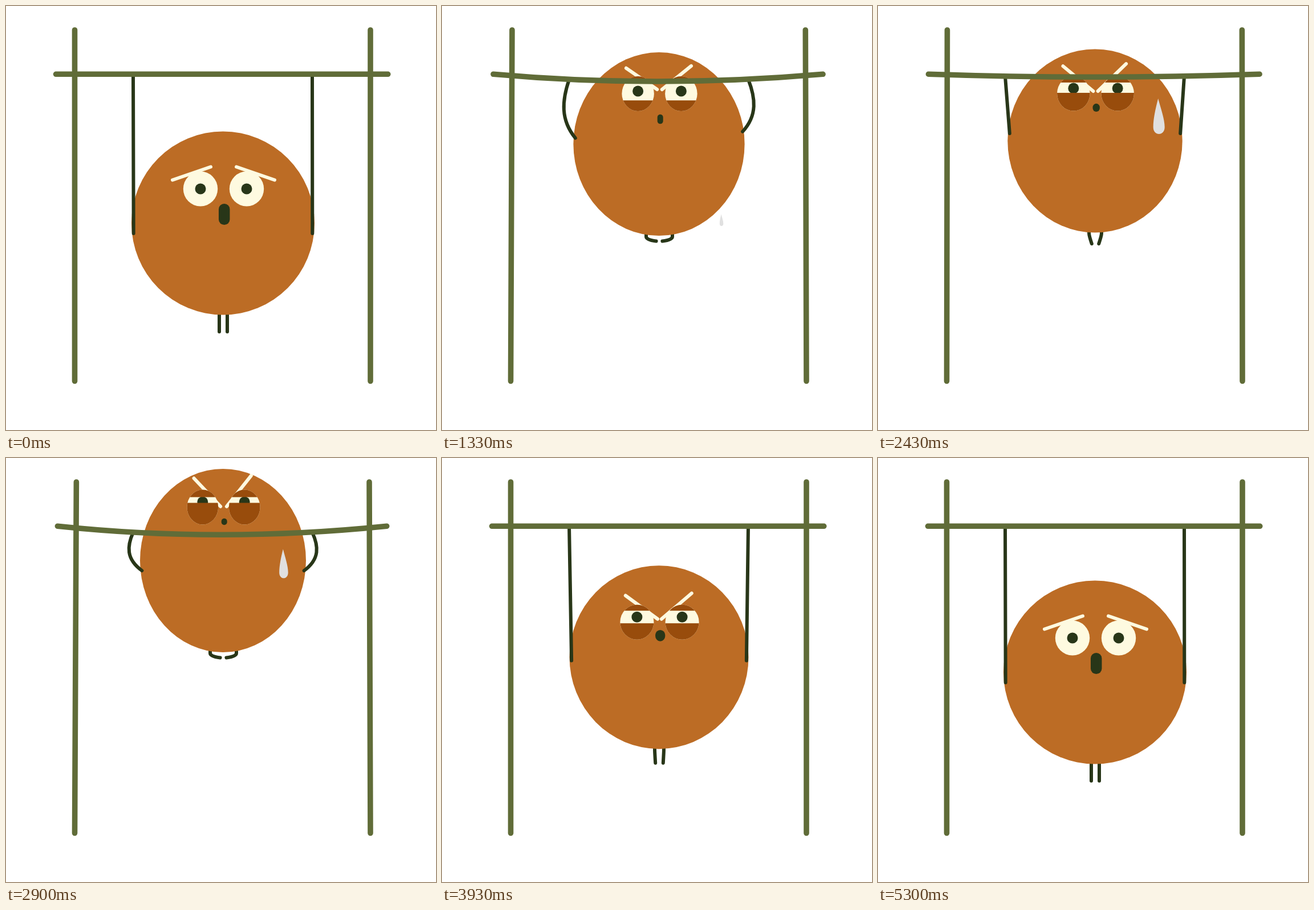
An HTML page with a canvas for the animation above (5.33 s loop, 754 by 742 pixels).

```html
<!DOCTYPE html>
<html lang="en">
<head>
<meta charset="utf-8">
<title>Pull-ups</title>
<style>
  html, body { margin: 0; width: 100%; height: 100%; overflow: hidden; background: #fff; }
  canvas { display: block; width: 100vw; height: 100vh; }
</style>
</head>
<body>
<canvas id="stage" width="754" height="742"></canvas>
<script>
const ctx = document.getElementById('stage').getContext('2d');
const OLIVE = '#606c38', DARK = '#283618', CREAM = '#fefae0', SKIN = '#bc6c25', LID = '#984c0c', SWEAT = '#e0e0e0';
const LOOP = 5330, REP = 52; // ms per loop, steps per pull-up
const MID = 380.5, R = 160.5;

const part = (s, from, to) => Math.min(1, Math.max(0, (s - from) / (to - from)));
const ease = (s, from, to) => { const u = part(s, from, to); return u * u * (3 - 2 * u); };
const bump = (s, from, to) => Math.sin(Math.PI * part(s, from, to)) ** 2;

// Everything that moves, from a few overlapping phases of one pull-up.
function poseAt(s) {
  const grit = ease(s, 2, 10);        // the face hardens
  const lift = ease(s, 9, 25);        // the face slides up
  const release = ease(s, 37.7, 43);  // the bar springs back
  const letGo = ease(s, 39, 43);      // limbs stretch out
  const wide = ease(s, 35, 43);       // eyes open in fright
  const recover = ease(s, 43, 51);    // back to rest
  const load = ease(s, 14, 27);
  const strain = load * (1 - release);
  const y = 380 - 200.5 * ease(s, 6, 26) - 16.5 * ease(s, 33, 36)
    + 272 * ease(s, 36.3, 43.9) - 65 * ease(s, 43.9, 48) + 10 * ease(s, 49, 53);
  const rx = R - 3.5 * grit * (1 - release) - 11.5 * strain
    + 6 * (ease(s, 36, 43) - ease(s, 44, 50));
  const hand = y + 18 - 31 * bump(s, 5, 33);
  return {
    y, rx,
    scale: rx / R,
    sag: 15 * strain,
    leftHand: hand - 50 * bump(s, 36, 47),
    rightHand: hand - 42 * bump(s, 36, 43),
    elbow: 20 * ease(s, 19, 27) * (1 - letGo),
    leg: 30 - (5 * grit + 15 * load) * (1 - letGo),
    eyeY: y - 60 - 33.5 * lift + 51.5 * ease(s, 38, 43) - 18 * recover,
    pupil: -9 * grit * (1 - wide),
    topLid: -31 + (11 * grit + 2.5 * load) * (1 - wide),
    lowLid: 31 - (29 * grit + 9.5 * load) * (1 - wide),
    anger: grit * (1 - release) * (1 + .13 * strain),
    mouthY: y - 15.5 - 21 * grit - 31.5 * lift + 49 * wide + 3.5 * recover,
    mouthW: 19.5 - (2 * grit + 7.5 * lift) * (1 - recover),
    mouthH: 37 - 17 * grit - 8.5 * lift + 10 * wide + 15.5 * recover,
    slide: part(s, 19, 39 + 3) ** 3 * 1.52,
    sweat: ease(s, 13, 19)
  };
}

function shape(color, build) {
  ctx.beginPath();
  build();
  ctx.fillStyle = color;
  ctx.fill();
}

function stroke(color, width, build) {
  ctx.beginPath();
  build();
  ctx.strokeStyle = color;
  ctx.lineWidth = width;
  ctx.stroke();
}

function line(color, width, x1, y1, x2, y2) {
  stroke(color, width, () => { ctx.moveTo(x1, y1); ctx.lineTo(x2, y2); });
}

const oval = (color, x, y, rx, ry) => shape(color, () => ctx.ellipse(x, y, rx, ry, 0, 0, 7));

function drawLegs({ y, leg }) {
  const bend = ((30 - leg) / 20) ** 2;
  for (const side of [-1, 1]) {
    const knee = 381 + side * (7 + 16 * bend);
    const toe = 381 + side * (7 - 1.6 * Math.min(1, 2 * bend));
    stroke(DARK, 6, () => {
      ctx.moveTo(knee, y + 150);
      ctx.lineTo(knee, y + 162);
      ctx.quadraticCurveTo(knee, y + 165 + 3 * bend, toe, y + 160 + leg);
    });
  }
}

function drawBrow(p, side) {
  const a = p.anger, mid = MID + 1, left = side < 0;
  const outerX = 89.5 - (left ? 28.5 : 32) * a;
  const outerY = -15.5 - (left ? 31 : 35) * a;
  const innerX = 22.5 - 19 * a + 38 * Math.max(0, a - 1);
  line(CREAM, 6, mid + side * outerX * p.scale, p.eyeY + outerY,
    mid + side * innerX * p.scale, p.eyeY - 38.5 + 33 * a);
}

function drawEye(p, side) {
  const x = MID + 1 + side * 40.5 * p.scale, y = p.eyeY;
  ctx.save();
  ctx.beginPath();
  ctx.ellipse(x, y, 30.2 * p.scale, 30.5, 0, 0, 7);
  ctx.clip();
  ctx.fillStyle = CREAM;
  ctx.fillRect(x - 40, y - 40, 80, 80);
  oval(DARK, x, y + p.pupil, 9.5, 9.5);
  ctx.fillStyle = LID;
  ctx.fillRect(x - 40, y - 40, 80, p.topLid + 40);
  ctx.fillRect(x - 40, y + p.lowLid, 80, 40);
  ctx.restore();
}

function drawFace(p) {
  for (const side of [-1, 1]) {
    drawBrow(p, side);
    drawEye(p, side);
  }
  const w = p.mouthW, h = p.mouthH;
  shape(DARK, () => ctx.roundRect(382.7 - w / 2, p.mouthY - h / 2, w, h, w / 2));
}

// The drop shrinks as it runs down the body.
function drawDrop(p) {
  const size = p.sweat * (1 - .67 * p.slide);
  if (size <= 0) return;
  ctx.save();
  ctx.translate(MID + 117 * p.scale, p.y - 74 + 197 * p.slide);
  ctx.scale(size * p.scale, size);
  shape(SWEAT, () => {
    ctx.moveTo(-1, 0);
    ctx.bezierCurveTo(4, 18, 11, 36, 11, 50);
    ctx.bezierCurveTo(11, 66, -10, 66, -10, 50);
    ctx.bezierCurveTo(-10, 36, -6, 18, -1, 0);
  });
  ctx.restore();
}

function drawArm(p, side, handY) {
  const x = 380 + side * 157, y = 119.5 + .7 * p.sag, handX = MID + side * .977 * p.rx;
  const dx = (handX - x) / 3, dy = (handY - y) / 3, out = side * p.elbow;
  stroke(DARK, 6, () => {
    ctx.moveTo(x, y);
    ctx.bezierCurveTo(x + dx + out * .8, y + dy + 2, x + 2 * dx + out * 1.15, y + 2 * dy + 2, handX, handY);
  });
}

function drawFrame({ sag }) {
  const pull = sag * .19;
  line(OLIVE, 9.6, 120.5 + pull, 42, 120.5, 656.5);
  line(OLIVE, 9.6, 639 - pull * .7, 42, 639, 656.5);
  stroke(OLIVE, 9.6, () => {
    ctx.moveTo(87.5 + pull, 119.3);
    ctx.quadraticCurveTo(374, 119.3 + 2 * sag, 669.7 - pull * .7, 119.3);
  });
}

function draw(p) {
  ctx.clearRect(0, 0, 754, 742);
  ctx.lineCap = ctx.lineJoin = 'round';
  drawLegs(p);
  oval(SKIN, MID, p.y, p.rx, R);
  drawFace(p);
  drawDrop(p);
  drawArm(p, -1, p.leftHand);
  drawArm(p, 1, p.rightHand);
  drawFrame(p);
}

// 30 pictures a second; every fortieth pose is held for two.
function tick() {
  const count = Math.floor((performance.now() % LOOP + 4) * .03);
  draw(poseAt(Math.floor(count * 39 / 40) % REP));
  requestAnimationFrame(tick);
}
tick();
</script>
</body>
</html>
```
